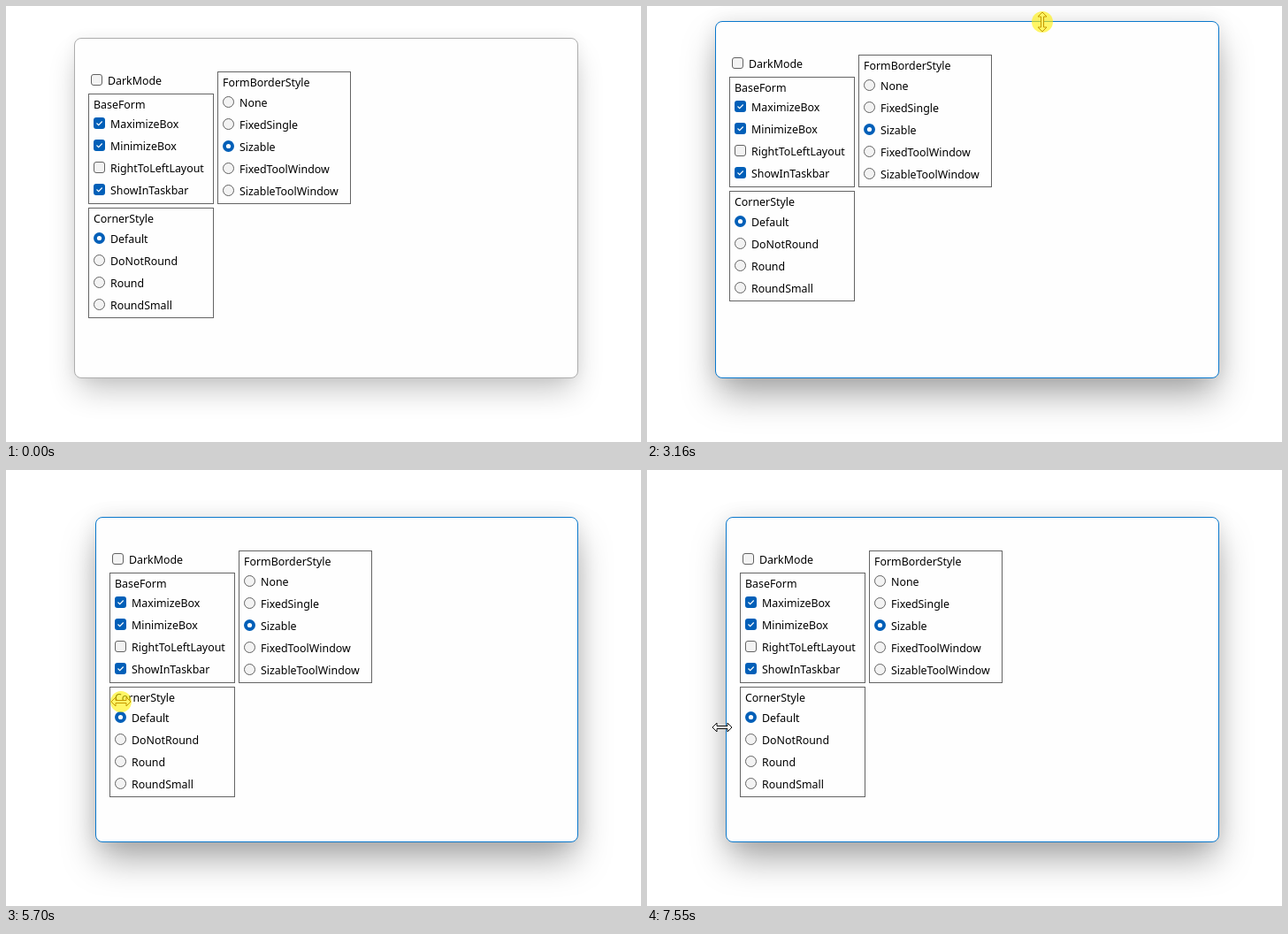
These frames come from a looping animation (718x493 px, 8000 ms). An HTML page:

```html
<!DOCTYPE html>
<html lang="en">
<head>
<meta charset="utf-8">
<title>Window resize demo</title>
<style>
  html, body { margin: 0; width: 100%; height: 100%; overflow: hidden; background: #fff; }
  #window {
    position: absolute; box-sizing: border-box;
    border: 1px solid; border-radius: 8px; background: #fefefe;
  }
  svg { position: absolute; left: 0; top: 0; }
  text { font: 12.4px "Noto Sans", "Open Sans", sans-serif; fill: #000; }
  .group { fill: none; stroke: #646464; }
  .off { fill: #f3f3f3; stroke: #626262; }
  .on { fill: #005fb8; }
  .tick { fill: none; stroke: #fff; stroke-width: 1.1; }
  .dot { fill: #fff; }
  .cursor { fill: #fff; stroke: #111; stroke-linejoin: round; }
</style>
</head>
<body>
<div id="window"></div>
<svg width="718" height="493">
  <g id="content"></g>
  <g id="pointer">
    <path id="shape" class="cursor"/>
    <circle id="glow" r="12" fill="#fff000" fill-opacity=".6"/>
  </g>
</svg>
<script>
const LOOP = 8000, RIGHT = 647, BOTTOM = 421, HOME = { left: 77, top: 36 };
const LAG = 70, MAX_TOP = 87;
const $ = id => document.getElementById(id);

// Form content, relative to the window's top left corner
const label = (x, baseline, s) => `<text x="${x}" y="${baseline}">${s}</text>`;

function checkbox(x, y, s, checked) {
  const box = checked
    ? `<rect class="on" x="${x - 6.5}" y="${y - 6.5}" width="13" height="13" rx="3"/>
       <path class="tick" d="M${x - 3} ${y}l2.2 2.2l4-4.2"/>`
    : `<rect class="off" x="${x - 6}" y="${y - 6}" width="12" height="12" rx="2.5"/>`;
  return box + label(x + 12.5, y + 5, s);
}

function radio(x, y, s, checked) {
  const mark = checked
    ? `<circle class="on" cx="${x}" cy="${y}" r="6.5"/><circle class="dot" cx="${x}" cy="${y}" r="2.6"/>`
    : `<circle class="off" cx="${x}" cy="${y}" r="6"/>`;
  return mark + label(x + 12.5, y + 5, s);
}

function group(x, y, w, h, title, firstRow, item, names, checked) {
  const rows = names.map((s, i) => item(x + 12, y + firstRow + 25 * i, s, checked.includes(s)));
  return `<rect class="group" x="${x}" y="${y}" width="${w}" height="${h}"/>`
    + label(x + 5.5, y + 16.5, title) + rows.join("");
}

$("content").innerHTML =
  checkbox(25.5, 47.5, "DarkMode", false) +
  group(16.5, 63.5, 141, 124, "BaseForm", 33, checkbox,
    ["MaximizeBox", "MinimizeBox", "RightToLeftLayout", "ShowInTaskbar"],
    ["MaximizeBox", "MinimizeBox", "ShowInTaskbar"]) +
  group(162.5, 38.5, 150, 149, "FormBorderStyle", 34, radio,
    ["None", "FixedSingle", "Sizable", "FixedToolWindow", "SizableToolWindow"], ["Sizable"]) +
  group(16.5, 192.5, 141, 124, "CornerStyle", 34, radio,
    ["Default", "DoNotRound", "Round", "RoundSmall"], ["Default"]);

// Pointer path: [time, x, y]
const path = [
  [480, 547, 441], [620, 520, 340], [830, 475, 180], [1000, 452, 90], [1160, 446, 43],
  [1230, 438, 64], [1310, 439, 55], [1380, 441, 42], [1590, 443, 38], [2180, 443, 37],
  [2250, 443, 45], [2460, 443, 128], [2600, 444, 136], [2800, 446, 100], [3000, 447, 36],
  [3080, 447, 18], [3240, 447, 18], [3500, 446, 52], [3700, 446, 74], [3780, 446, 71],
  [3850, 446, 62], [3920, 446, 54], [3990, 446, 54], [4260, 204, 180], [4470, 115, 238],
  [4670, 89, 253], [4740, 80, 261], [4890, 76, 262], [5200, 76, 262], [5210, 73, 265],
  [5490, 73, 264], [5560, 76, 263], [5630, 97, 262], [5700, 130, 262], [5910, 290, 265],
  [5980, 307, 267], [6050, 285, 270], [6250, 99, 276], [6320, 80, 278], [6600, 54, 281],
  [6660, 54, 282], [6730, 56, 282], [7000, 97, 287], [7070, 95, 289], [7210, 88, 290],
  [7350, 85, 291],
];

function pointerAt(t) {
  const i = path.findIndex(k => k[0] > t);
  if (i === 0) return path[0].slice(1);
  if (i < 0) return path[path.length - 1].slice(1);
  const [a, b] = [path[i - 1], path[i]];
  const p = (t - a[0]) / (b[0] - a[0]);
  return [1, 2].map(n => Math.round(a[n] + (b[n] - a[n]) * p));
}

const ARROW = "M.5 .5V17L4.3 13.4L6.8 19L9.2 18L6.7 12.4H11.8Z";
const VERTICAL = "M0-11L5-6H1.5V6H5L0 11L-5 6H-1.5V-6H-5Z";
const HORIZONTAL = "M-11 0L-6-5V-1.5H6V-5L11 0L6 5V1.5H-6V5Z";
const shapes = [[0, ARROW], [1120, VERTICAL], [1230, ARROW], [1380, VERTICAL],
  [3990, ARROW], [4740, HORIZONTAL]];

// The picture is refreshed in 70 ms steps counted from these moments
const anchors = [0, 480, 1310, 1590, 2250, 3070, 3160, 3290, 3920, 4260, 4740,
  5210, 5560, 5700, 6390, 6730, 7210, 7550];
const lastBefore = (list, t, key = v => v) => list.filter(v => key(v) <= t).pop();

function stepTime(t) {
  const start = lastBefore(anchors, t);
  return start + Math.floor((t - start) / 70) * 70;
}

function windowAt(t) {
  const [x, y] = pointerAt(t - LAG);
  const top = t < 2250 ? HOME.top
    : Math.min(MAX_TOP, (t < 3990 ? y : pointerAt(3920)[1]) - 1);
  return { left: t < 5560 ? HOME.left : x + 4, top };
}

function render(now) {
  const t = stepTime(now % LOOP);
  const { left, top } = windowAt(t);
  const active = t >= 1590;
  const focus = Math.min(1, Math.max(0, (t - 1520) / 400));
  const mix = (a, b) => a + (b - a) * focus;

  Object.assign($("window").style, {
    left: left + "px", top: top + "px",
    width: RIGHT - left + "px", height: BOTTOM - top + "px",
    borderColor: active ? "#0a78cc" : "#adadad",
    boxShadow: `0 ${mix(18, 22)}px ${mix(34, 40)}px ${mix(-6, -4)}px rgba(0,0,0,${mix(.24, .35)}),
      0 0 ${mix(16, 22)}px rgba(0,0,0,${mix(.05, .09)})`,
  });
  $("content").setAttribute("transform", `translate(${left} ${top})`);

  const [x, y] = pointerAt(t);
  const pressed = active && t < 3990 || t >= 5560 && t < 7550;
  $("pointer").setAttribute("transform", `translate(${x} ${y})`);
  $("pointer").style.display = t < 480 ? "none" : "";
  $("shape").setAttribute("d", lastBefore(shapes, t, s => s[0])[1]);
  $("shape").style.stroke = pressed ? "#701800" : "";
  $("glow").style.display = pressed ? "" : "none";
}

const began = performance.now();
function tick() {
  render(performance.now() - began);
  requestAnimationFrame(tick);
}
tick();
</script>
</body>
</html>
```
